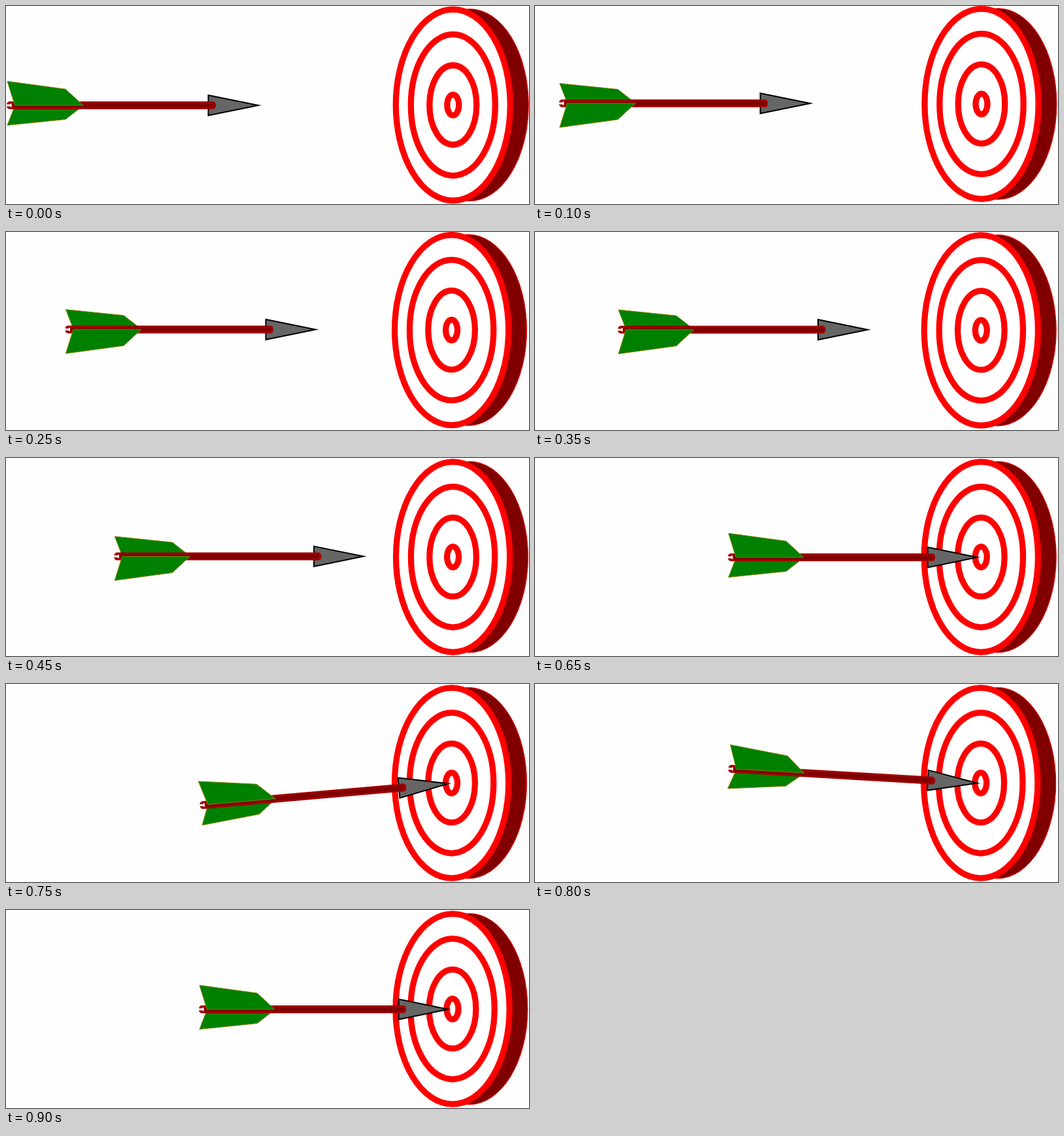
Write an HTML page with a canvas that moves like this. It is 800 px wide and 303 px high and loops after 5.9 s.

```html
<!DOCTYPE html>
<html lang="en">
<head>
<meta charset="utf-8">
<title>Arrow and target</title>
<style>
html, body { margin: 0; width: 100%; height: 100%; overflow: hidden; background: #fefefe; }
canvas { display: block; width: 800px; height: 303px; }
</style>
</head>
<body>
<canvas id="stage" width="800" height="303"></canvas>
<script>
const ctx = document.getElementById('stage').getContext('2d');
const LOOP = 5900, STEP = 50, LAST = 18, HIT = 13;
const PAPER = '#fefefe';

function paint(fill, stroke, width) {
  if (fill) { ctx.fillStyle = fill; ctx.fill(); }
  if (stroke) { ctx.strokeStyle = stroke; ctx.lineWidth = width; ctx.stroke(); }
}

function ellipse(x, rx, ry, fill, stroke, width) {
  ctx.beginPath();
  ctx.ellipse(x, 0, rx, ry, 0, 0, Math.PI * 2);
  paint(fill, stroke, width);
}

function poly(points, fill, stroke, width) {
  ctx.beginPath();
  points.forEach(p => ctx.lineTo(p[0], p[1]));
  ctx.closePath();
  paint(fill, stroke, width);
}

function bar(x, w, h, r, fill) {
  ctx.beginPath();
  ctx.roundRect(x, -h / 2, w, h, r);
  paint(fill);
}

function feather(outer, bend, front, base) {
  poly([[-388.5, outer], [-299.5, bend], [front, base], [-377, base]],
    '#008000', '#808000', 1);
}

function drawTarget(x, y, scale) {
  ctx.save();
  ctx.translate(x, y);
  ctx.scale(scale, scale);
  ellipse(25.5, 90, 147, '#800000', '#f00', 1);
  for (const r of [87.5, 64.5, 36, 9]) {
    ellipse(0, r, r * 1.66 + 1, '#fff', '#f00', 9.3);
  }
  ctx.restore();
}

// The arrow's tip is the origin.
function drawArrow(x, y, length, flip, angle) {
  ctx.save();
  ctx.translate(x, y);
  ctx.rotate(angle * Math.PI / 180);
  ctx.scale(length, flip);
  poly([[-81, -15.5], [-4.6, 0], [-81, 15.5]], '#666', '#000', 2);
  feather(30.5, 21.5, -273, 1);
  bar(-389.5, 320, 12, 5, '#a00000');
  bar(-381, 308, 6.4, 3, '#800000');
  ctx.fillStyle = PAPER;
  ctx.fillRect(-390, -1.5, 8, 3);
  ctx.fillRect(-384, -2.5, 2, 5);
  feather(-36.8, -24.8, -272.5, 0);
  ctx.restore();
}

function draw(now) {
  const n = Math.min(LAST, Math.floor(now % LOOP / STEP));
  const flying = n > 0 && n < HIT;
  const lift = flying ? 1.6 * Math.max(0, 1 - (n / 9) ** 4) : 0;

  ctx.fillStyle = PAPER;
  ctx.fillRect(0, 0, 800, 303);

  const sway = 1.1 * Math.cos(n * Math.PI / 5);
  drawTarget(682.7 + sway, 151.5 - lift, n ? 0.995 : 1);

  // Steady flight with a late burst of speed, then a fading quiver.
  const f = Math.min(n, HIT);
  const x = 390.5 + 17.5 * f + 63 * (f / HIT) ** 8;
  const y = 152 - (flying ? lift + 1.4 : 0);
  const length = 1 - 0.009 * Math.min(1, n / 9);
  const k = n - HIT;
  const angle = k > 0 ? 5 * (k % 2 ? 1 : -1) * Math.min(1, (5 - k) / 3) : 0;
  drawArrow(x, y, length, flying ? -1 : 1, angle);
}

let start;
function tick(now) {
  start ??= now;
  draw(now - start);
  requestAnimationFrame(tick);
}
draw(0);
requestAnimationFrame(tick);
</script>
</body>
</html>
```
